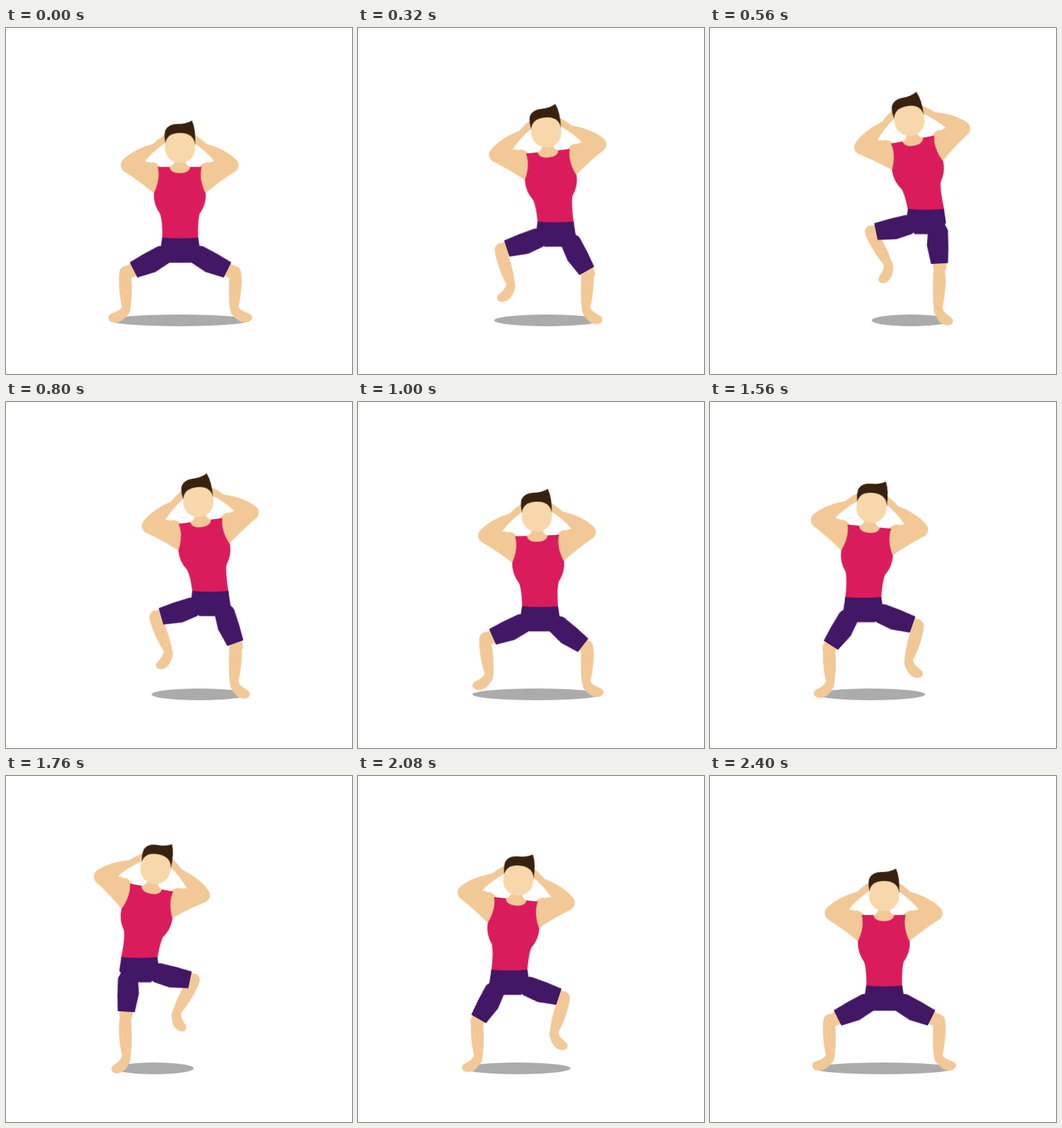
Recreate the animation shown at these times as an HTML page without scripts. Size 500 px wide and 500 px high, loop 2800 ms.

```html
<!DOCTYPE html>
<html lang="en">
<head>
<meta charset="utf-8">
<title>Side-to-side squat</title>
<style>
  html, body { margin: 0; height: 100%; overflow: hidden; background: #fff; }
  svg { display: block; width: 100%; height: 100%; }

  .skin { fill: #f1c896; }
  .face { fill: #f8d8aa; }
  .hair { fill: #38210f; }
  .shirt { fill: #da1c5c; }
  .pants { fill: #421766; }
  .shadow { fill: #ababab; }

  /* Each part rests in the squat and goes to --r (right) and --l (left). */
  .part { animation: sway 2.8s cubic-bezier(.365, 0, .635, 1) infinite; }
  @keyframes sway {
    0%, 41.429%, 47.143%, 85.714%, 100% { transform: none; }
    21.429% { transform: var(--r); }
    64.286% { transform: var(--l); }
  }

  .body { --r: translate(61px, -41.7px); --l: translate(-60px, -41.7px); }
  .torso { --r: rotate(-10.5deg); --l: rotate(10.5deg); transform-origin: 251px 303px; }
  .shadow { --r: translate(40px, 0) scale(.555, 1); --l: translate(-37.5px, 0) scale(.555, 1); transform-origin: 251px 422.5px; }

  .thigh { --lift: rotate(15deg); --plant: rotate(-61deg); transform-origin: 0 0; }
  .shin { --lift: translate(60.5px, -60.3px) rotate(-27deg); --plant: none; transform-origin: 174.6px 353.5px; }
  .foot { --lift: rotate(-11deg); --plant: rotate(-16deg); transform-origin: 174px 405px; }
  .left .thigh, .left .shin, .left .foot { --r: var(--lift); --l: var(--plant); }
  .right .thigh, .right .shin, .right .foot { --r: var(--plant); --l: var(--lift); }
</style>
</head>
<body>
<svg viewBox="0 0 500 500">
  <defs>
    <path id="shin" d="M163.500 357Q163 346 173 343.500Q183 347 181 362Q183 383 180 405L168 405Q162 380 163.500 357Z"/>
    <path id="foot" d="M168 403Q164 409 154 412Q147 414 148 420Q151 426 160 425.500Q168 424 174 417Q180 412 180 403Z"/>
    <g id="thigh">
      <path class="skin" d="M-10 54V60Q-9.500 71 -3 71H3Q9 71 9.500 62V54Z"/>
      <path class="pants" d="M-10 0L-12.800 6.500Q-15 9 -14.700 14L-14.100 35L-12.300 58H12.300L16.800 31L14 8L10 0Z"/>
    </g>
    <path id="arm" d="M230 153Q222 157 212 166.500Q185 174 169.500 188.500Q161 197 169 206Q190 219 213 238Q223 217 218.500 200Q211 193 200 192Q210 179 231 164Z"/>
  </defs>

  <ellipse class="shadow part" cx="251" cy="422.5" rx="101.5" ry="8.5"/>

  <g class="left skin">
    <g class="shin part">
      <use href="#shin"/>
      <g class="foot part"><use href="#foot"/></g>
    </g>
  </g>
  <g class="right skin" transform="translate(503.5) scale(-1 1)">
    <g class="shin part">
      <use href="#shin"/>
      <g class="foot part"><use href="#foot"/></g>
    </g>
  </g>

  <g transform="translate(.7 .7)">
    <g class="body part">
      <g class="torso part">
        <path class="skin" d="M206 203L210 193Q217 194 223 201ZM294.500 203L290.500 193Q283.500 194 277.500 201Z"/>
        <path class="shirt" d="M218 200H285L288 238Q289 254 279 268Q276 280 277 309H225Q226 280 222 268Q212 254 213 238Z"/>
        <path class="skin" d="M243 186H258V192Q259 197 265.500 200Q264 209 250.500 209Q237 209 235.500 200Q242 197 243 192Z"/>
        <g class="skin">
          <use href="#arm"/>
          <use href="#arm" transform="translate(500.5) scale(-1 1)"/>
        </g>
        <path class="hair" d="M230 167Q227 155 229.500 147Q234 138 247 138Q260 138 268 133Q274 146 272.500 168Z"/>
        <path class="face" d="M229.500 167Q231 151 251 151Q270.500 151 272.500 168V173C272.500 186 262 194.400 251 194.400S229 186 229 173Z"/>
      </g>

      <g class="left">
        <g transform="translate(235.5 323) rotate(63.4)">
          <g class="thigh part"><use href="#thigh"/></g>
        </g>
      </g>
      <g class="right" transform="translate(503) scale(-1 1)">
        <g transform="translate(235.5 323) rotate(63.4)">
          <g class="thigh part"><use href="#thigh"/></g>
        </g>
      </g>
      <path class="pants" d="M225 302Q251 304.500 277 302L279 315L280 322L268 338.500H235L222 322L223 315Z"/>
    </g>
  </g>
</svg>
</body>
</html>
```
